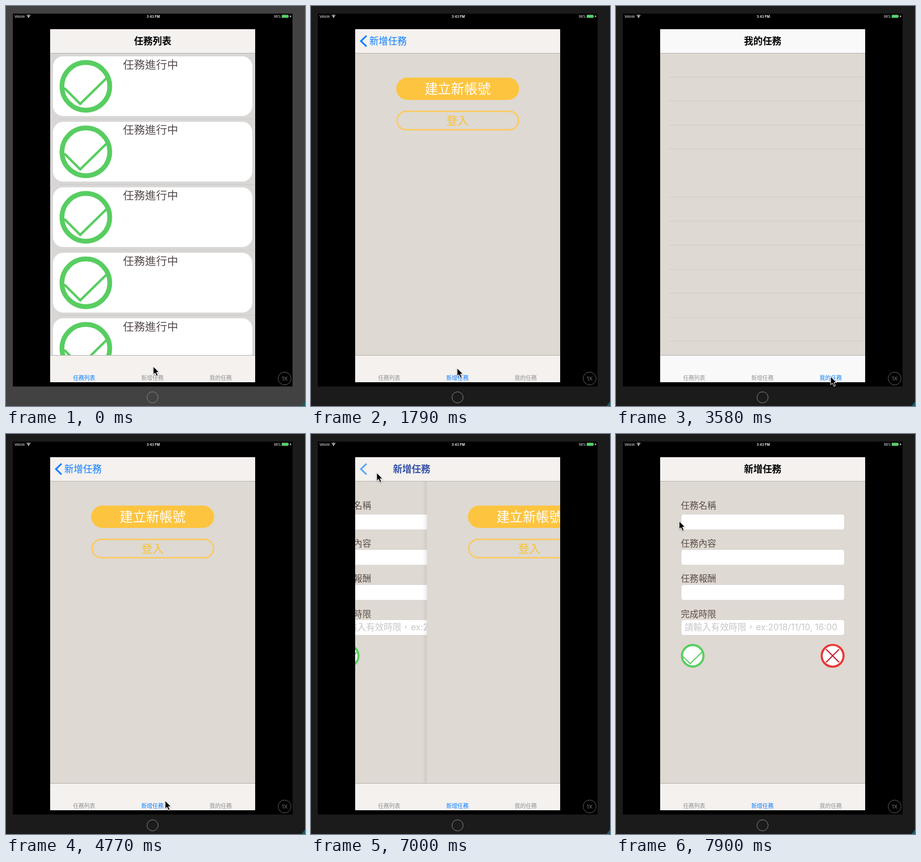
Animation of 528 by 707 pixels, one loop 8 s. Source, as an HTML page:

```html
<!DOCTYPE html>
<html lang="zh-Hant">
<head>
<meta charset="utf-8">
<style>
html, body { margin: 0; width: 100%; height: 100%; overflow: hidden; background: #1b1b1b; }
svg { display: block; width: 528px; height: 707px; font-family: "Noto Sans CJK TC", "Noto Sans CJK", sans-serif; }
.latin { font-family: Inter, Roboto, sans-serif; }
.mid { text-anchor: middle; }
</style>
</head>
<body>
<svg id="stage" viewBox="0 0 528 707"></svg>
<script>
const BLUE = '#0a7dff', SAND = '#ded9d2';
const TICK = 149.2, LOOP = 8000;
const stage = document.getElementById('stage');

const text = (x, y, size, fill, str, more = '') =>
  `<text x="${x}" y="${y}" font-size="${size}" fill="${fill}" ${more}>${str}</text>`;
const rect = (x, y, w, h, fill, more = '') =>
  `<rect x="${x}" y="${y}" width="${w}" height="${h}" fill="${fill}" ${more}/>`;
const line = (d, color, width) =>
  `<path d="${d}" fill="none" stroke="${color}" stroke-width="${width}"/>`;
const rows = (n, fn) => Array.from({ length: n }, (_, i) => fn(i)).join('');

const check = (x, y, scale) => `<g transform="translate(${x} ${y}) scale(${scale})">
  <circle r="42.2" fill="#fff" stroke="#58cd61" stroke-width="8.4"/>
  ${line('M-38 3L-10 31L37 -15', '#58cd61', 4.2)}</g>`;

const list = rect(78, 84, 362, 534, '#d9d7d6') + rows(5, i => {
  const y = 89 + 115.75 * i;
  return rect(83, y, 352, 105.5, '#fff', 'rx="18"') +
    check(141, y + 53, 1) +
    text(206.5, y + 21.5, 19.5, '#54494a', '任務進行中', 'font-weight="500"') +
    rect(93, Math.round(y + 110), 347, 1, '#cdcbc9');
});

const account = rect(70, 84, 8, 534, 'url(#edge)') + rect(78, 84, 362, 534, SAND) +
  rect(150.5, 126.5, 217, 39.5, '#fdc43f', 'rx="19.7"') +
  text(259, 155, 23.3, '#fff', '建立新帳號', 'class="mid"') +
  rect(152, 186.3, 214.5, 32.5, 'none', 'rx="16.2" stroke="#fdc95c" stroke-width="2.4"') +
  text(258.7, 209.6, 19.4, '#f9c22e', '登入', 'class="mid" font-weight="500"');

const mine = rect(78, 84, 362, 534, SAND) + rows(12, i =>
  i === 4 ? '' : rect(93, Math.round(125 + 42.45 * i), 347, 1, '#d1cdc7'));

const fields = [['任務名稱', 132, 141.5], ['任務內容', 199, 204], ['任務報酬', 261.3, 266], ['完成時限', 323.5, 328]];
const form = rect(78, 84, 480, 534, SAND) + fields.map(([label, base, top]) =>
  text(114.5, base, 15.6, '#5c5048', label) +
  rect(115, top + .2, 288.5, 27.6, '#fff', 'rx="4.5" stroke="#d0cbc4" stroke-width=".7"')).join('') +
  `<g font-family="'Noto Sans CJK SC', sans-serif">${text(121, 347, 15.6, '#c7c7cb', '請輸入有效時限，')}</g>` +
  text(247, 347, 15.4, '#c7c7cb', 'ex:2018/11/10, 16:00', 'class="latin"') +
  check(135.5, 392, .45) +
  '<circle cx="382.5" cy="392" r="19.3" fill="#fff" stroke="#ec3535" stroke-width="3.6"/>' +
  line('M371 380.5L394 403.5M394 380.5L371 403.5', '#c5152a', 1.9);

const statusBar = text(15, 20.5, 5.6, '#fff', 'Velorin', 'class="latin"') +
  line('M36.5 17.2Q39.8 14.4 43.1 17.2M37.8 18.7Q39.8 17 41.8 18.7', '#fff', 1.1) +
  '<circle cx="39.8" cy="20" r=".9" fill="#fff"/>' +
  text(260, 20.5, 5.8, '#fff', '3:43 PM', 'class="latin mid" font-weight="600"') +
  text(473, 20.5, 5.6, '#fff', '98%', 'class="latin"') +
  rect(487, 15.8, 11.5, 5, '#4cd964', 'rx="1" stroke="#7f9a85" stroke-width=".6"') +
  rect(499.3, 17.3, .7, 2, '#7f9a85') +
  '<path d="M503.2 15.8L501 18.7H502.4L501.8 20.8L504.1 17.8H502.7Z" fill="#fff"/>';

const tabs = ['任務列表', '新增任務', '我的任務'].map((name, i) =>
  text(138 + 120.6 * i, 661.3, 9.8, '#929292', name, 'class="mid tab" font-weight="500"')).join('');

stage.innerHTML = `
<defs>
  <clipPath id="screen"><rect x="78" y="41" width="362" height="624"/></clipPath>
  <linearGradient id="edge"><stop stop-opacity="0"/><stop offset="1" stop-opacity=".07"/></linearGradient>
</defs>
${rect(0, 0, 528, 707, '#1b1b1b', 'id="bezel"')}
<path d="M528 699V707H522Z" fill="#12606b"/>
${rect(12, 13.5, 494, 659, '#000')}
${statusBar}
<circle cx="258.8" cy="691.7" r="9.8" fill="none" stroke="#858585"/>
<circle cx="492" cy="658.4" r="11.4" fill="none" stroke="#5e5e5e"/>
${text(492, 662, 9.6, '#777', '1X', 'class="latin mid"')}
<g clip-path="url(#screen)">
  <g id="list">${list}</g>
  <g id="mine">${mine}</g>
  <g id="form">${form}</g>
  <g id="account">${account}</g>
  ${rect(78, 41, 362, 42, '#f4f1ef', 'class="bar"')}
  ${rect(78, 83, 362, 1, '#b6b3b0')}
  ${rect(78, 618, 362, 47, '#f4f1ef', 'class="bar"')}
  ${rect(78, 617, 362, 1, '#b6b3b0')}
  <g id="chevron">${line('M98 52.5L88.2 62L98 71.5', BLUE, 3)}</g>
  ${text(103, 67.8, 16.5, BLUE, '新增任務', 'id="back"')}
  ${text(259, 67.8, 16.5, '#000', '', 'id="title" class="mid" font-weight="700"')}
  ${tabs}
</g>
<path id="cursor" d="M0 0V14.5L3.3 11.5L5.8 17.2L8.4 16.1L6 10.5H10.4Z" stroke="#fff" stroke-width="1"
  style="filter: drop-shadow(0 1px 1px rgba(0,0,0,.3))"/>`;

const $ = id => document.getElementById(id);
const show = (id, on) => $(id).style.display = on ? '' : 'none';

// [tick, x, y] of the pointer tip
const path = [
  [0, 260, 637], [1, 258, 641], [6, 258, 641], [7, 258, 640], [15, 258, 640],
  [22, 379, 655], [25, 379, 655], [30, 281, 648], [33, 281, 648],
  [38, 179, 103], [41, 191, 137], [42, 193, 139], [46, 116, 68.5], [49, 116, 68.5],
  [53, 111.5, 154], [99, 111.5, 154]
];
const popSteps = [.35, .87, .99];

function pointer(tick) {
  const i = path.findIndex(p => p[0] > tick) - 1;
  const [t0, x0, y0] = path[i], [t1, x1, y1] = path[i + 1];
  const k = (tick - t0) / (t1 - t0);
  return [x0 + (x1 - x0) * k, y0 + (y1 - y0) * k];
}

function draw(tick) {
  const pop = tick < 47 ? 0 : popSteps[tick - 47] ?? 1;
  const page = tick < 12 ? 'list' : tick < 24 ? 'account' : tick < 32 ? 'mine' : pop ? 'form' : 'account';
  const left = 1 - pop;

  for (const id of ['list', 'mine', 'form']) show(id, id === page);
  show('account', page === 'account' || (pop && pop < 1));
  $('form').setAttribute('transform', `translate(${-108.6 * left} 0)`);
  $('account').setAttribute('transform', `translate(${362 * pop} 0)`);

  const hasBack = page === 'account' || page === 'form';
  show('chevron', hasBack);
  $('chevron').style.opacity = left;
  show('back', page === 'account');

  const title = $('title');
  title.textContent = { list: '任務列表', mine: '我的任務', form: '新增任務' }[page] ?? '';
  const sliding = page === 'form' ? left : 0;
  title.setAttribute('x', 259 - 125 * sliding);
  title.setAttribute('fill', `rgb(${80 * sliding}, ${125 * sliding}, ${255 * sliding})`);

  const bar = page === 'mine' ? '#f9f9f9' : '#f4f1ef';
  document.querySelectorAll('.bar').forEach(b => b.setAttribute('fill', bar));
  const active = { list: 0, mine: 2 }[page] ?? 1;
  document.querySelectorAll('.tab').forEach((t, i) => t.setAttribute('fill', i === active ? BLUE : '#929292'));

  $('bezel').setAttribute('fill', tick < 11 ? '#424242' : '#1b1b1b');
  $('cursor').setAttribute('transform', `translate(${pointer(tick)})`);
}

const start = performance.now();
function frame() {
  const t = (performance.now() - start) % LOOP;
  draw(Math.floor((t + 14) / TICK));
  requestAnimationFrame(frame);
}
frame();
</script>
</body>
</html>
```
